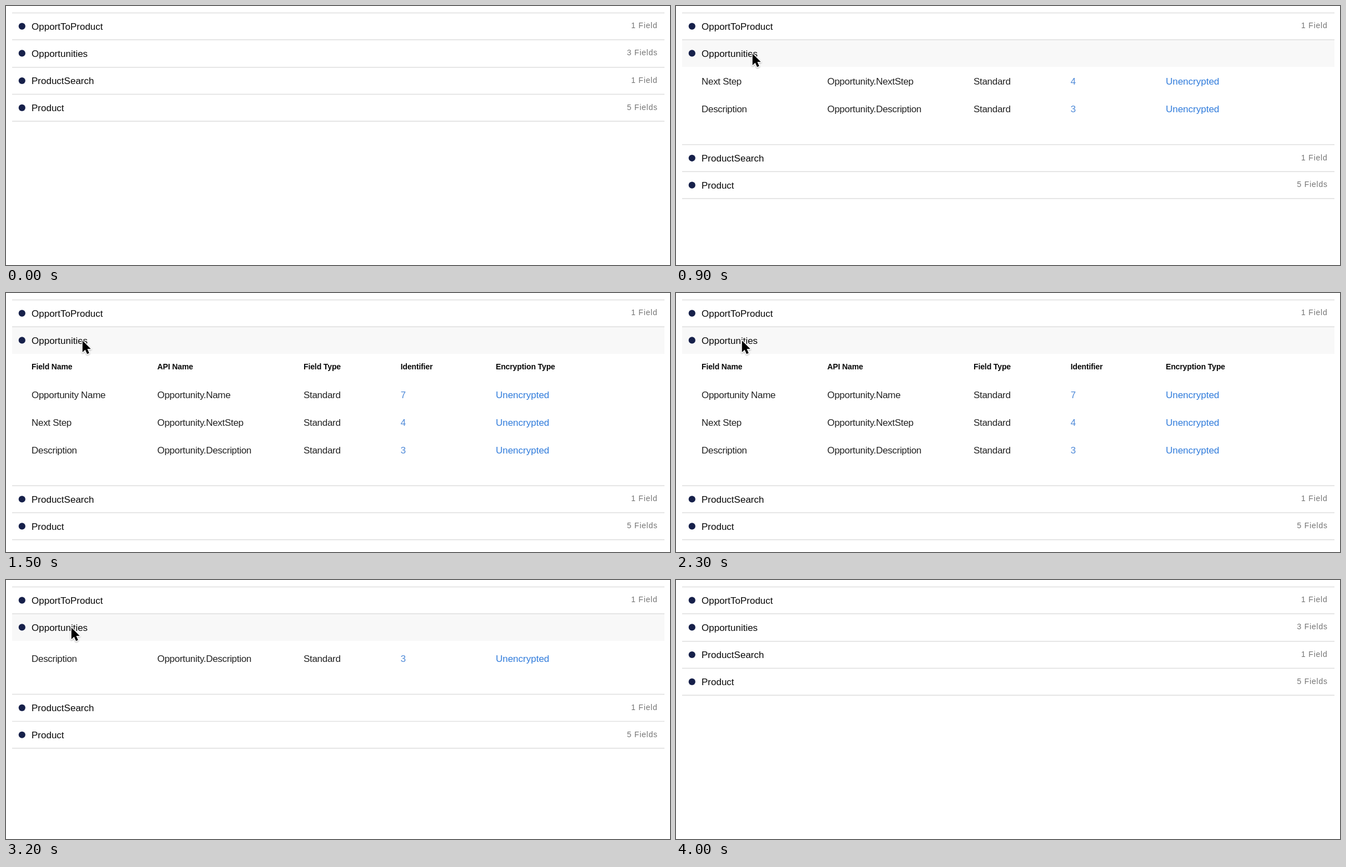
Recreate the animation shown at these times as an HTML page. Size 1196 by 468 pixels, loop 4500 ms.

```html
<!DOCTYPE html>
<html lang="en">
<head>
<meta charset="utf-8">
<title>Field list</title>
<style>
  html, body { margin: 0; width: 100%; height: 100%; overflow: hidden; background: #fff; }
  svg { display: block; width: 100%; height: 100%; }
  text { font-family: "Liberation Sans", Arial, sans-serif; font-size: 17px; fill: #080808; white-space: pre; }
  .count { font-size: 14px; letter-spacing: .8px; fill: #747474; }
  .head { font-size: 14px; font-weight: bold; letter-spacing: -.12px; }
  .cell { letter-spacing: -.3px; fill: #222; }
  .num { fill: #4f8ad8; }
  .link { fill: #2f7bdb; }
  .rule { stroke: #dedede; stroke-width: 1.4; }
  .dot { fill: #16204a; }
</style>
</head>
<body>
<svg viewBox="0 0 1196 468">
  <defs>
    <clipPath id="panel"><rect id="window" x="0" y="110" width="1196" height="0"/></clipPath>
    <filter id="shade" x="-50%" y="-50%" width="200%" height="200%">
      <feDropShadow dx="0" dy="1.2" stdDeviation="1.1" flood-opacity=".35"/>
    </filter>
  </defs>
  <rect id="hover" x="11" y="61" width="1175" height="49" fill="#f8f8f8"/>
  <g id="fixed"></g>
  <g clip-path="url(#panel)"><g id="table"></g></g>
  <g id="lower"></g>
  <circle id="ring" r="34" fill="none" stroke="#000" stroke-width="2.3"/>
  <path id="cursor" d="M0 0V21L4.9 16.6L8.3 24.2L12 22.6L8.7 15H15Z" fill="#000" stroke="#fff"
    stroke-width="2.6" stroke-linejoin="round" paint-order="stroke" filter="url(#shade)"/>
</svg>
<script>
const LOOP = 4500, STEP = 100, OPEN = 237.5;
const $ = id => document.getElementById(id);

function add(parent, tag, attrs, content) {
  const el = document.createElementNS("http://www.w3.org/2000/svg", tag);
  for (const key in attrs) el.setAttribute(key, attrs[key]);
  if (content) el.textContent = content;
  return parent.appendChild(el);
}

const rule = (parent, y) => add(parent, "line", { class: "rule", x1: 11, x2: 1186, y1: y, y2: y });

function row(parent, top, mid, name, fields) {
  rule(parent, top);
  add(parent, "circle", { class: "dot", cx: 28.8, cy: mid, r: 6.1 });
  add(parent, "text", { x: 46, y: mid + 6.1 }, name);
  const many = fields > 1;
  return add(parent, "text", { class: "count", x: many ? 1118.5 : 1126, y: mid + 3.8 },
    `${fields} Field${many ? "s" : ""}`);
}

row($("fixed"), 12.5, 36.6, "OpportToProduct", 1);
const count = row($("fixed"), 61, 85.4, "Opportunities", 3);
row($("lower"), 110.7, 135, "ProductSearch", 1);
row($("lower"), 159.5, 183.9, "Product", 5);
rule($("lower"), 208.2);

// The table is laid out in its fully open position.
const columns = [46, 272.5, 536, 710.7, 882.2];
const styles = ["cell", "cell", "cell", "cell num", "link"];
["Field Name", "API Name", "Field Type", "Identifier", "Encryption Type"].forEach((label, i) =>
  add($("table"), "text", { class: "head", x: columns[i], y: 137.6 }, label));
[["Opportunity Name", "Name", 7], ["Next Step", "NextStep", 4], ["Description", "Description", 3]]
  .forEach(([label, api, id], r) =>
    [label, "Opportunity." + api, "Standard", id, "Unencrypted"].forEach((value, i) =>
      add($("table"), "text", { class: styles[i], x: columns[i], y: 190 + r * 49.8 }, value)));

// Pointer stops: time, x, y. A null x means off stage.
const path = [
  [0, null], [100, 6, 82], [200, 55, 83], [300, 102, 85], [400, 128, 86], [500, 137, 86],
  [1700, 133, 86], [2000, 127, 86], [2100, 122, 86], [2300, 118, 86], [2500, 117, 86],
  [3600, 113, 82], [3700, 90, 94], [3800, 62, 120], [3900, 30, 156], [4000, null]
];

const swing = p => .5 - Math.cos(Math.PI * Math.min(1, Math.max(0, p))) / 2;

function panelHeight(t) {
  if (t < 800 || t >= 3300) return 0;
  if (t < 2000) return OPEN * swing((t - 733) / 300);
  return OPEN * (1 - swing((t - 2977) / 397));
}

const show = (el, on) => el.setAttribute("visibility", on ? "visible" : "hidden");
const move = (el, x, y) => el.setAttribute("transform", `translate(${x} ${y})`);

function draw(time) {
  const t = Math.floor(time % LOOP / STEP) * STEP;
  const height = panelHeight(t);
  move($("lower"), 0, height);
  move($("table"), 0, height - OPEN);
  $("window").setAttribute("height", height);
  show($("hover"), t >= 700 && t < 3300);
  show(count, t < 800 || t >= 3300);

  const [, x, y] = path.findLast(stop => stop[0] <= t);
  const present = x !== null;
  show($("cursor"), present);
  show($("ring"), t === 700 || t === 2900);
  if (present) {
    move($("cursor"), x + .8, y);
    move($("ring"), x + .7, y + 1);
  }
}

const start = performance.now();
function tick() {
  draw(performance.now() - start);
  requestAnimationFrame(tick);
}
tick();
</script>
</body>
</html>
```
